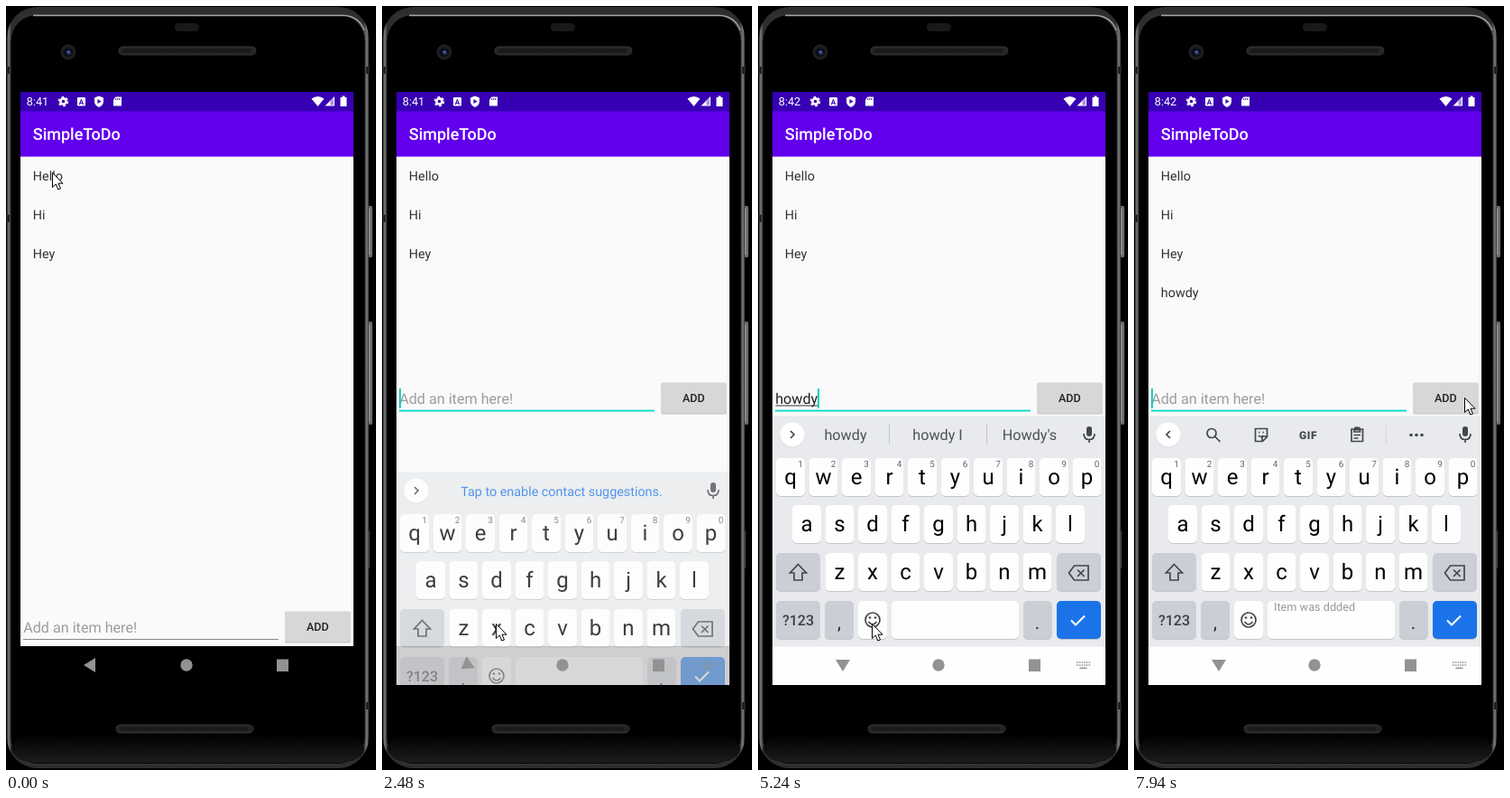
These frames come from a looping animation (410x845 px, 8 s). An HTML page:

```html
<!DOCTYPE html>
<html lang="en">
<head>
<meta charset="utf-8">
<title>To-do list</title>
<style>
html, body { margin: 0; width: 100%; height: 100%; overflow: hidden; background: #000; }
svg { display: block; width: 410px; height: 845px; font-family: Roboto, sans-serif; text-rendering: geometricPrecision; }
.mid { text-anchor: middle; }
.line { fill: none; stroke: #44474b; stroke-width: 1.7; }
</style>
</head>
<body>
<svg id="stage" viewBox="0 0 410 845" xmlns="http://www.w3.org/2000/svg"></svg>
<script>
const LOOP = 8000;
const rect = (x, y, w, h, fill, r = 0, more = '') =>
  `<rect x="${x}" y="${y}" width="${w}" height="${h}" rx="${r}" fill="${fill}" ${more}/>`;
const text = (x, y, size, fill, str, more = '') =>
  `<text x="${x}" y="${y}" font-size="${size}" fill="${fill}" ${more}>${str}</text>`;
const path = (d, more = 'class="line"') => `<path d="${d}" ${more}/>`;
const circle = (x, y, r, fill, more = '') => `<circle cx="${x}" cy="${y}" r="${r}" fill="${fill}" ${more}/>`;
const group = (id, body, more = '') => `<g id="${id}" ${more}>${body}</g>`;
const mid = 'class="mid"';

function phone() {
  const pill = (x, y) => rect(x, y, 152, 9, '#242424', 4.5, 'stroke="#363636"') +
    path(`M${x + 5} ${y + 4.5}h142`, 'stroke="#101010" stroke-width="4" stroke-dasharray="1 1"');
  const button = (y, h) => rect(401, y, 5, h, '#6a6a6a', 1.5) + rect(402, y + 3, 1.5, h - 6, '#959595');
  const seams = [[0, 67], [0, 231], [399, 67], [399, 770]]
    .map(([x, y]) => rect(x, y, 4, 8, '#222')).join('');
  return rect(0, 0, 410, 845, '#000') +
    button(221, 57) + button(349, 114) + rect(401, 581, 2, 41, '#444') +
    rect(1, 1, 401, 842, 'url(#rim)', 34) +
    rect(5, 9.5, 393, 829, '#000', 29, 'stroke="#3a3a3a"') +
    path('M30 10.500H374Q391 11 397 27', 'fill="none" stroke="#a5a5a5" stroke-width="1.4"') +
    rect(6, 805, 391, 32, 'url(#chin)', 26) + seams +
    rect(187, 19, 27, 9, '#191919', 4.5) + pill(125, 45) + pill(122, 795) +
    circle(69, 51, 8.5, '#1d1f22') + circle(69, 51, 5.5, '#0d101c') + circle(69.5, 51.5, 2.2, '#33427c') +
    circle(69, 50.5, 0.8, '#8d9bd0');
}

function statusBar() {
  const white = 'fill="#fff"';
  return rect(16, 95, 369, 21.5, '#3700b3') + text(22.8, 110, 12.6, '#fff', '', 'id="clock"') +
    circle(63.5, 105.5, 3.1, 'none', 'stroke="#fff" stroke-width="2.6"') +
    circle(63.5, 105.5, 4.9, 'none', 'stroke="#fff" stroke-width="1.8" stroke-dasharray="2.6 2.53"') +
    rect(79, 101, 9, 9.5, '#fff', 1) + text(83.5, 109, 8, '#3700b3', 'A', mid + ' font-weight="700"') +
    path('M103 99.5l5 2v4q0 4-5 6.5q-5-2.500-5-6.500v-4z', white) + path('M101.500 103l4 2.500l-4 2.500z', 'fill="#3700b3"') +
    path('M121.500 100.500h6.500v10h-9v-7z', white) +
    path('M121.800 102v2m2-2v2m2-2v2', 'stroke="#3700b3" stroke-width=".9"') +
    path('M338.500 102.500Q345.500 97.500 352.500 102.500L345.500 111z', white) +
    path('M364 100v10.500h-10.500z', white) + path('M359.500 105.500l3.500-3.500v7.500h-3.500z', 'fill="#3700b3" opacity=".45"') +
    path('M372.500 99.500h3v1.500h2v10h-7v-10h2z', white);
}

function entry() {
  return rect(19, 446.7, 283, 1.8, '#03dac5', 0, 'id="rule"') +
    text(19.2, 440, 16.16, '#9c9c9c', 'Add an item here!', 'id="hint"') +
    text(19.2, 440, 16.16, '#202020', '', 'id="typed"') +
    rect(19.5, 441.5, 0, 1, '#333', 0, 'id="spell"') +
    rect(19, 423, 2, 22, '#12d2bf', 0, 'id="caret"') +
    rect(309, 417.5, 73, 34, '#c4c4c4', 2) + rect(309, 416.5, 73, 34, '#d6d7d7', 2) +
    circle(367, 434, 0, '#000', 'id="ripple" opacity=".07" clip-path="url(#buttonClip)"') +
    text(345.3, 438, 12.57, '#222', 'ADD', mid + ' font-weight="500"');
}

function keyboard() {
  const key = (x, y, w, fill = '#fefefe') => rect(x, y + 1, w, 42, '#c3c6ca', 5) + rect(x, y, w, 42, fill, 5);
  const grey = '#cbced5';
  const row = (letters, x, y) => [...letters].map((c, i) => {
    const cx = x + i * 36.5;
    const digit = y === 500 ? text(cx + 11, 510, 10, '#63666a', (i + 1) % 10, mid) : '';
    return key(cx - 16, y, 32) + text(cx, y + 28.5, 24, '#000', c, mid) + digit;
  }).join('');
  const mic = rect(364, 465, 6, 11, '#44474b', 3) + path('M361 473q0 6.500 6 6.500t6-6.500M367 479v4');
  const words = [97, 199, 301].map(x => text(x, 480, 16.2, '#4d5054', '', mid + ' data-word')).join('');
  const dividers = path('M145.500 463v22M253.500 463v22', 'stroke="#c4c7cb"');
  const tools = circle(86, 472.5, 5, 'none', 'class="line"') + path('M89.500 476l6 6') +
    path('M134.500 467.500h13v9l-5 5h-8zM147 476h-5v5') + path('M138 475q2.500 3 5 0M138 471.500h1.500m3 0h1.500') +
    text(193, 478.5, 12, '#44474b', 'GIF', mid + ' font-weight="900" letter-spacing=".6"') +
    path('M241 468h12.500v13.500h-12.500zM244 468v3h6.500v-3M243.500 474.500h7.500M243.500 478h5') +
    rect(244, 465.5, 6.5, 4, '#44474b', 1) +
    path('M279.500 464v20', 'stroke="#d2d4d7"') +
    [307, 313, 319].map(x => circle(x, 474.5, 1.8, '#44474b')).join('');
  return rect(16, 453.5, 369, 300, '#e8eaed') +
    circle(38, 475, 13.5, '#d7d9dc') + circle(38, 474, 13.5, '#fff') +
    path('M36 470l4 4l-4 4', 'id="chevron" class="line"') + mic +
    text(199, 480, 14.36, '#1a73e8', 'Tap to enable contact suggestions.', mid + ' id="offer"') +
    group('words', words + dividers) + group('tools', tools) +
    row('qwertyuiop', 36, 500) + row('asdfghjkl', 54, 552) + row('zxcvbnm', 90.5, 605) +
    key(20, 605, 49, grey) + path('M44.500 617.500l9 9.500h-4.500v8h-9v-8h-4.500z') +
    key(331, 605, 49, grey) + path('M350.500 619h15.500v16h-15.500l-6-8zM354 623.500l7.500 7.500m0-7.500l-7.500 7.500') +
    key(20, 658, 49, grey) + text(44.5, 685, 16, '#3c4043', '?123', mid + ' font-weight="500"') +
    key(74, 658, 32, grey) + text(90, 689, 20, '#26282b', ',', mid) +
    key(111, 658, 32) + circle(127, 679, 8, 'none', 'class="line"') +
    circle(124, 676.5, 1.3, '#44474b') + circle(130, 676.5, 1.3, '#44474b') + path('M122.500 681q4.500 6 9 0') +
    key(148, 658, 141) + key(294, 658, 31.5, grey) + text(309.5, 689, 20, '#26282b', '.', mid) +
    key(331, 658, 49, '#1a73e8') + path('M347 679.500l5 5l10-10', 'fill="none" stroke="#fff" stroke-width="2"');
}

const imeIcon = [0, 1].map(r => path(`M353 ${726 + r * 3}h15`, 'stroke="#929292" stroke-width="1.6" stroke-dasharray="1.6 1.1"')).join('') +
  path('M356.500 732.300h8', 'stroke="#929292" stroke-width="1.5"');
const nav = path('M86 729l13-8v16z', 'id="back" fill="#929292"') + circle(200, 729, 6.7, '#929292') +
  rect(300, 722.5, 13, 13.5, '#929292') + group('ime', imeIcon);

const stage = document.getElementById('stage');
stage.innerHTML = `<defs>
  <linearGradient id="rim"><stop stop-color="#2c2c2c"/><stop offset=".005" stop-color="#7c7c7c"/>
    <stop offset=".012" stop-color="#2e2e2e"/><stop offset=".985" stop-color="#2e2e2e"/>
    <stop offset=".995" stop-color="#7c7c7c"/><stop offset="1" stop-color="#2c2c2c"/></linearGradient>
  <linearGradient id="chin" x2="0" y2="1"><stop stop-color="#000"/><stop offset="1" stop-color="#1c1c1c"/></linearGradient>
  <clipPath id="screen">${rect(16, 95, 369, 656, '#000')}</clipPath>
  <clipPath id="buttonClip">${rect(309, 416.5, 73, 34, '#000', 2)}</clipPath></defs>` +
  phone() +
  group('app', rect(16, 166, 369, 542, '#fafafa') + rect(16, 116, 369, 50.6, '#6200ee') + rect(16, 708, 369, 43, '#000') +
    statusBar() + text(29.8, 148, 18, '#fff', 'SimpleToDo', 'font-weight="500"') +
    ['Hello', 'Hi', 'Hey', 'howdy'].map((s, i) => text(29.8, 193.3 + i * 43, 14.37, '#303030', s, i === 3 ? 'id="added"' : '')).join('') +
    group('entry', entry()) + group('keys', keyboard()) +
    rect(16, 708.5, 369, 43, '#fefefe', 0, 'id="navLight"') + nav +
    text(155, 669, 12.7, '#999', 'Item was ddded', 'id="toast"'), 'clip-path="url(#screen)"') +
  path('M0 0V16L3.800 12.500L6.300 18.500L9 17.500L6.500 11.700H11.500Z', 'id="mouse" fill="#fff" stroke="#000" stroke-width="1" stroke-linejoin="round"');

// Each track holds [start time, value...] and keeps a value until the next start.
const mouseTrack = [[0, 51, 184], [300, 52, 185], [610, 54, 186], [760, 56, 186], [1030, 88, 328], [1180, 104, 592],
  [1300, 126, 681], [1450, 126, 683], [6580, 136, 675], [6720, 210, 560], [6845, 290, 440], [6970, 344, 379],
  [7110, 366, 401], [7240, 366, 433]];
const slideTrack = [[0, 300, 0], [2360, 164, .32], [2480, 62, .75], [2600, 12, .96], [2720, 0, 1]];
const navTrack = [[0, 0, 0], [2480, -35, .4], [2600, -70, .8], [2720, -90, 1]];
const caretTrack = [[0, 0], [1960, 1], [2720, 0], [3120, 1], [3550, 0], [4130, 1], [5700, 0], [6120, 1], [6580, 0],
  [7110, 1], [7520, 0], [7790, 1]];
const typedTrack = [[0, ''], [4250, 'h'], [4400, 'ho'], [4700, 'how'], [4970, 'howd'], [5090, 'howdy'], [7790, '']];
const wordTrack = [[0], [4400, 'h', 'he', 'have'], [4550, 'ho', 'hope', 'hot'], [4820, 'how', 'how’s', 'house'],
  [5090, 'howd', 'how’d', 'hold'], [5240, 'howdy', 'howdy I', "Howdy's"], [7940]];
const rippleTrack = [[0, 0], [7520, 24], [7640, 50], [7790, 64], [7940, 0]];

const at = (track, t) => track.findLast(step => step[0] <= t).slice(1);
const $ = id => document.getElementById(id);
const set = (id, attrs) => { for (const k in attrs) $(id).setAttribute(k, attrs[k]); };
const show = (id, on) => set(id, { visibility: on ? 'visible' : 'hidden' });
const wordNodes = [...document.querySelectorAll('[data-word]')];

function draw(t) {
  const [mx, my] = at(mouseTrack, t);
  const [slide, alpha] = at(slideTrack, t);
  const [turn, light] = at(navTrack, t);
  const [typed] = at(typedTrack, t);
  const words = at(wordTrack, t);
  const focused = t >= 1960, added = t >= 7940;

  set('mouse', { transform: `translate(${mx + 0.5} ${my + 0.5})` });
  $('clock').textContent = t < 2600 ? '8:41' : '8:42';
  set('entry', { transform: `translate(0 ${t < 2360 ? 253 : 0})` });
  set('rule', focused ? { height: 1.8, y: 446.7, fill: '#03dac5' } : { height: 1, y: 447, fill: '#898989' });
  show('hint', !typed);
  $('typed').textContent = typed;
  const width = typed ? $('typed').getComputedTextLength() : 0;
  set('spell', { width });
  set('caret', { x: 19 + width });
  show('caret', at(caretTrack, t)[0]);
  set('ripple', { r: at(rippleTrack, t)[0] });

  set('keys', { transform: `translate(0 ${slide})`, opacity: alpha });
  show('offer', !words.length && !added);
  show('words', words.length);
  wordNodes.forEach((node, i) => { node.textContent = words[i] || ''; });
  show('tools', added);
  set('chevron', { d: added ? 'M40 470l-4 4l4 4' : 'M36 470l4 4l-4 4' });
  set('navLight', { opacity: light });
  set('back', { transform: `rotate(${turn} 93.5 728.5)` });
  show('ime', t >= 2210);
  show('added', added);
  show('toast', added);
}

const start = performance.now();
function tick() {
  draw((performance.now() - start) % LOOP);
  requestAnimationFrame(tick);
}
draw(0);
requestAnimationFrame(tick);
</script>
</body>
</html>
```
